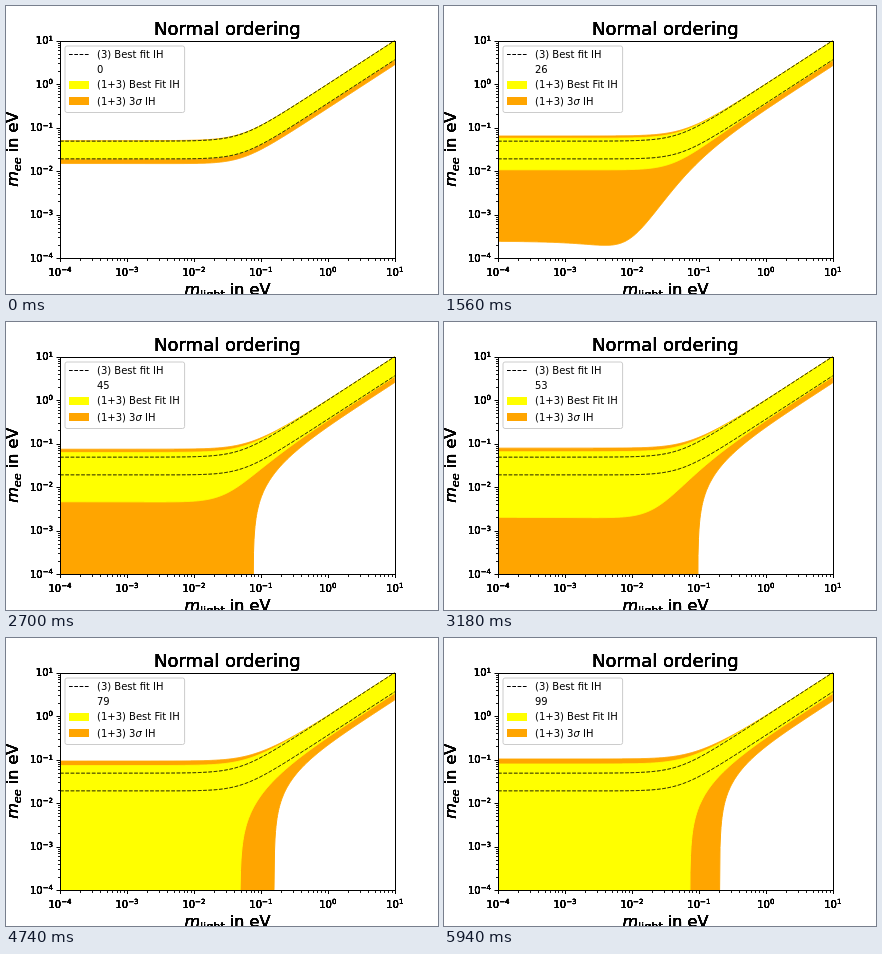
These frames come from a looping animation (432 by 288 pixels, 6000 ms). An HTML page:

```html
<!DOCTYPE html>
<html lang="en">
<head>
<meta charset="utf-8">
<title>Normal ordering</title>
<style>
  html, body { margin: 0; width: 100%; height: 100%; overflow: hidden; background: #fff; }
  svg { display: block; width: 432px; height: 288px; }
  text { font-family: "DejaVu Sans", sans-serif; font-size: 10px; white-space: pre; }
  .it { font-style: italic; }
</style>
</head>
<body>
<svg id="stage" viewBox="0 0 432 288" xmlns="http://www.w3.org/2000/svg">
  <defs><clipPath id="area"><rect x="54" y="34.56" width="334.8" height="217.44"/></clipPath></defs>
  <rect width="432" height="288" fill="#fff"/>
  <g clip-path="url(#area)">
    <path id="wide" fill="orange" stroke="orange"/>
    <path id="best" fill="yellow" stroke="yellow"/>
    <g fill="none" stroke="#000" stroke-dasharray="3.7 1.6">
      <path id="upper"/>
      <path id="lower"/>
    </g>
  </g>
  <path id="major" stroke="#000" fill="none"/>
  <path id="minor" stroke="#000" stroke-width=".9" fill="none"/>
  <rect x="54.5" y="35.5" width="335" height="217" fill="none" stroke="#000"/>
  <g id="labels"></g>
  <rect x="59" y="40" width="119.6" height="66.5" rx="2" fill="#fff" stroke="#ccc"/>
  <path d="M63 48.5H83" stroke="#000" stroke-dasharray="3.7 1.6"/>
  <rect x="63" y="75" width="20" height="8" fill="yellow"/>
  <rect x="63" y="91" width="20" height="8" fill="orange"/>
  <text x="91" y="52">(3) Best fit IH</text>
  <text id="count" x="91" y="67">0</text>
  <text x="91" y="82">(1+3) Best Fit IH</text>
  <text x="91" y="98.5">(1+3) 3<tspan class="it">σ</tspan> IH</text>
</svg>
<script>
const $ = id => document.getElementById(id);
const LEFT = 54, RIGHT = 388.8, TOP = 34.56, BOTTOM = 252;
const DX = (RIGHT - LEFT) / 5, DY = (BOTTOM - TOP) / 5;
const STEP = 60, COUNT = 100;

const massAt = x => 10 ** ((x - LEFT) / DX - 4);
const yOf = v => TOP + (1 - Math.log10(Math.max(v, 1e-9))) * DY;

// Effective mass: three light states plus a sterile one with mixing s4.
const STERILE = 1.7;
const mix = (m, s4, light, sign) =>
  (1 - s4) * light + sign * s4 * Math.sqrt(STERILE + m * m);
const maxMass = (m, gap, s13) => (1 - s13) * Math.sqrt(gap + m * m) + s13 * m;
const minMass = (m, gap, s12, s13) =>
  (1 - s13) * (1 - 2 * s12) * Math.sqrt(gap + m * m) - s13 * m;

const BEST = { gapHi: 0.00247, gapLo: 0.00247, s12: 0.304, s13: 0.0219, rate: 0.000317 };
const WIDE = { gapHi: 0.00262, gapLo: 0.00242, s12: 0.345, s13: 0.0244, rate: 0.0005565 };

const xs = [];
for (let x = LEFT; x < RIGHT; x += 0.5) xs.push(x);
xs.push(RIGHT);

const points = f => xs.map(x =>
  x.toFixed(1) + ' ' + Math.min(yOf(f(massAt(x))), 400).toFixed(2));
const high = (p, s4) => points(m => mix(m, s4, maxMass(m, p.gapHi, p.s13), 1));
const low = (p, s4) => points(m => mix(m, s4, minMass(m, p.gapLo, p.s12, p.s13), -1));
const line = pts => 'M' + pts.join('L');

function band(p, n) {
  const s4 = n * p.rate / Math.sqrt(STERILE);
  return line(high(p, s4).concat(low(p, s4).reverse())) + 'Z';
}

// Stacked copies give the labels their heavy edges.
function label(attrs, body) {
  $('labels').insertAdjacentHTML('beforeend', `<text ${attrs}>${body}</text>`.repeat(6));
}

function drawAxes() {
  let major = '', minor = '';
  for (let i = 0; i <= 5; i++) {
    const x = LEFT + i * DX, y = BOTTOM - i * DY;
    const sx = Math.round(x) + 0.5, sy = Math.round(y) + 0.5;
    major += `M${sx} 252.5v3.5M54.5 ${sy}h-4`;
    const power = `10<tspan dy="-3.8" font-size="7" style="font-size:7px">${String(i - 4).replace('-', '\u2212')}</tspan>`;
    label(`x="${x}" y="270" text-anchor="middle"`, power);
    label(`x="47" y="${(y + 3.9).toFixed(2)}" text-anchor="end"`, power);
    for (let k = 2; k < 10 && i < 5; k++) {
      const f = Math.log10(k);
      minor += `M${Math.round(x + f * DX) + 0.5} 252.5v2.5` +
               `M54.5 ${Math.round(y - f * DY) + 0.5}h-2.5`;
    }
  }
  $('major').setAttribute('d', major);
  $('minor').setAttribute('d', minor);

  const name = (sub, cls) => `<tspan class="it">m</tspan>` +
    `<tspan class="${cls}" dy="2.5" style="font-size:11.2px">${sub}</tspan><tspan dy="-2.5"> in eV</tspan>`;
  const big = 'text-anchor="middle" style="font-size:16px"';
  label('x="221.4" y="28.8" text-anchor="middle" style="font-size:18px"', 'Normal ordering');
  label(`x="221.4" y="289.3" ${big}`, name('light', ''));
  label(`transform="translate(12.3 143.3) rotate(-90)" ${big}`, name('ee', 'it'));
}

let shown = -1;
function draw(time) {
  const n = Math.floor(time / STEP) % COUNT;
  if (n === shown) return;
  shown = n;
  $('wide').setAttribute('d', band(WIDE, n));
  $('best').setAttribute('d', band(BEST, n));
  $('count').textContent = n;
}

drawAxes();
$('upper').setAttribute('d', line(high(BEST, 0)));
$('lower').setAttribute('d', line(low(BEST, 0)));
draw(0);

const start = performance.now();
(function tick() {
  draw(Math.max(0, performance.now() - start));
  requestAnimationFrame(tick);
})();
</script>
</body>
</html>
```
